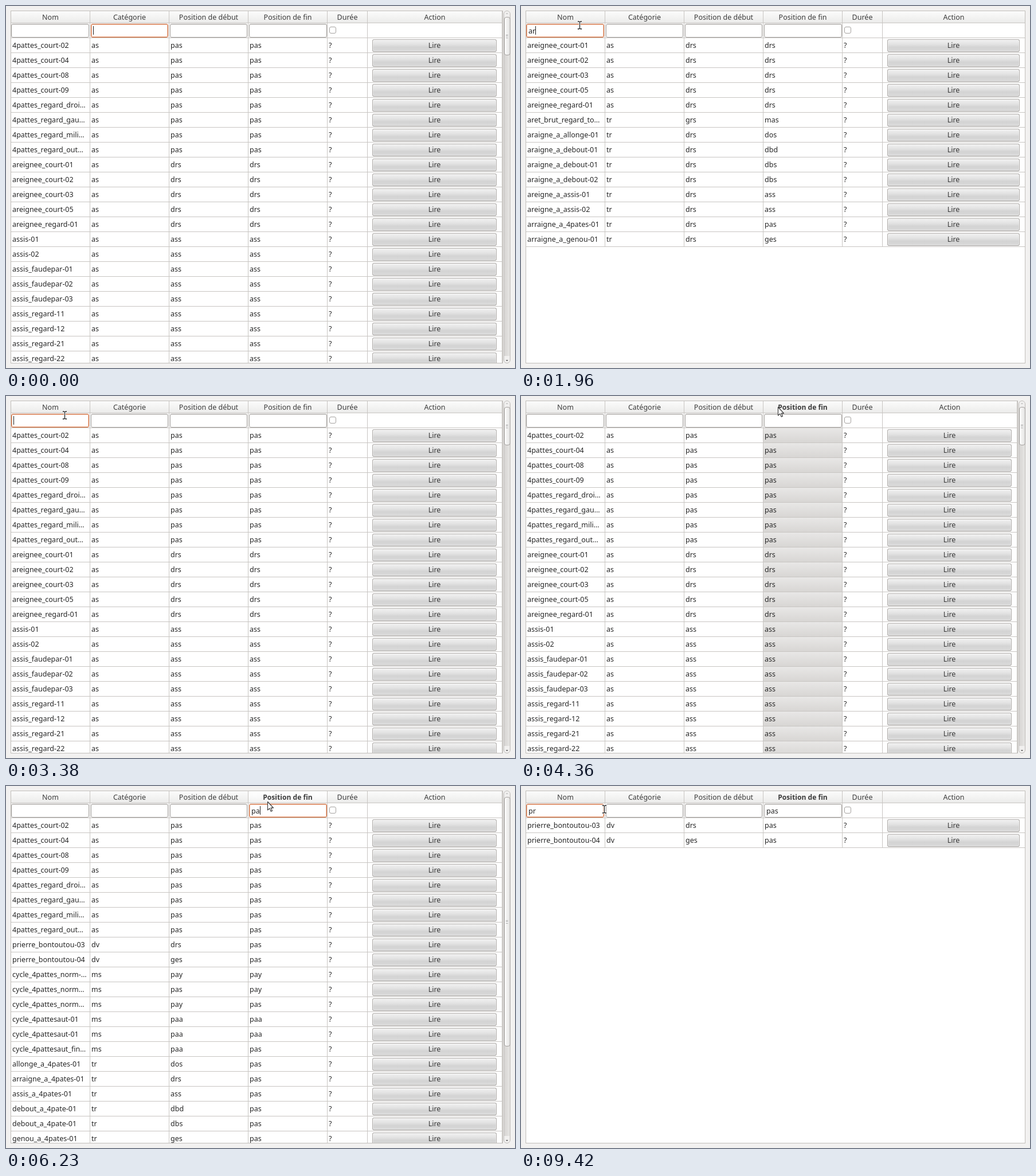
These frames come from a looping animation (888x631 px, 9.76 s). An HTML page:

```html
<!DOCTYPE html>
<html lang="fr">
<head>
<meta charset="utf-8">
<title>Table filtrable</title>
<style>
html, body { margin: 0; width: 100%; height: 100%; overflow: hidden; background: #f2f1f0; }
body { position: relative; font: 12.5px/26px "Noto Sans", "Open Sans", sans-serif; color: #262626; }
div { position: absolute; box-sizing: border-box; white-space: pre; }
#frame { left: 8px; top: 8px; height: 615px; background: #fff; border: 1px solid #c1beba; overflow: hidden; }
.cell { border: solid #c8c5c2; border-width: 0 1px 1px 0; padding-left: 2px; overflow: hidden; }
.head { background: linear-gradient(#fbfbfb, #f4f4f3 50%, #ebebea); color: #3c3c3c; text-align: center; line-height: 21px; padding: 0; }
.bold { font-weight: bold; font-size: 12.1px; }
.hover { background: linear-gradient(#fff, #fafafa 50%, #f1f1f0); }
.sel { background: linear-gradient(#e8e7e6, #d8d6d4); }
.btn { border: 1px solid #aeaba8; border-bottom-color: #9c9996; border-radius: 3px; text-align: center; line-height: 20px;
  color: #3c3c3c; background: linear-gradient(#f1f1f1, #e2e2e2 40%, #d3d3d3 65%, #dadada); box-shadow: inset 0 0 0 1px rgba(255,255,255,.4); }
.field { border: 1px solid #a3a09d; border-radius: 3px; background: #fff; box-shadow: inset 0 1px 1px #e2e0de; }
.focus { border-color: #cb6a3c; box-shadow: inset 0 0 0 1px #efbfa6; }
.field span { position: absolute; left: 3px; top: 3px; height: 15px; line-height: 17px; min-width: 1px; box-sizing: border-box; }
.caret { border-right: 1px solid #222; }
#check { left: 564px; top: 36px; width: 12px; height: 12px; border: 1px solid #a5a2a0; border-radius: 3px; background: #fff; }
#bar { left: 868px; top: 8px; width: 12px; height: 615px; border: 1px solid #bcb9b6; border-radius: 6px; background: linear-gradient(90deg, #d6d4d2, #e6e5e3); }
.cap { left: 0; width: 10px; height: 12px; background: #f0efee; }
#thumb { left: 0; top: 10px; width: 11px; border: 1px solid #a5a29f; border-radius: 4px; background: linear-gradient(90deg, #fcfcfc, #e4e3e2); }
#grip { left: 2px; top: 50%; margin-top: -3px; width: 4px; height: 6px; background: repeating-linear-gradient(#aaa 0 1px, #fafafa 1px 2.5px); }
.tri { left: 3px; border: 2.5px solid transparent; width: 0; height: 0; }
svg { position: absolute; left: 0; top: 0; overflow: visible; }
</style>
</head>
<body>
<div id="frame"></div>
<div id="fields"></div>
<div id="check"></div>
<div id="bar">
  <div class="cap" style="top:0;border-radius:5px 5px 0 0"></div>
  <div class="cap" style="bottom:0;border-radius:0 0 5px 5px"></div>
  <div class="tri" style="top:1px;border-bottom-color:#bbb"></div>
  <div class="tri" style="bottom:1px;border-top-color:#444"></div>
  <div id="thumb"><div id="grip"></div></div>
</div>
<svg id="pointer" width="1" height="1">
  <path id="arrow" d="M0 0V14.5L3.4 11.4L5.7 16.8L8 15.8L5.7 10.6H10Z" fill="#fff" stroke="#333" stroke-width="1.1" stroke-linejoin="round"/>
  <g id="beam" fill="none" stroke-linecap="square">
    <path d="M-3 -6.5H-1.5L0 -5.5L1.5 -6.5H3M0 -5.5V5.5M-3 6.5H-1.5L0 5.5L1.5 6.5H3" stroke="#fff" stroke-width="3"/>
    <path d="M-3 -6.5H-1.5L0 -5.5L1.5 -6.5H3M0 -5.5V5.5M-3 6.5H-1.5L0 5.5L1.5 6.5H3" stroke="#222" stroke-width="1.3"/>
  </g>
</svg>
<script>
const LOOP = 9760;
const $ = id => document.getElementById(id);

// category, start position, end position: names
const DATA = `
as pas pas: 4pattes_court-02 4pattes_court-04 4pattes_court-08 4pattes_court-09 4pattes_regard_droi… 4pattes_regard_gau… 4pattes_regard_mili… 4pattes_regard_out…
as drs drs: areignee_court-01 areignee_court-02 areignee_court-03 areignee_court-05 areignee_regard-01
as ass ass: assis-01 assis-02 assis_faudepar-01 assis_faudepar-02 assis_faudepar-03 assis_regard-11 assis_regard-12 assis_regard-21 assis_regard-22
dv drs pas: prierre_bontoutou-03
dv ges pas: prierre_bontoutou-04
ms pay pay: cycle_4pattes_norm-…
ms pas pay: cycle_4pattes_norm…
ms pay pas: cycle_4pattes_norm…
ms paa paa: cycle_4pattesaut-01 cycle_4pattesaut-01
ms paa pas: cycle_4pattesaut_fin…
tr grs mas: aret_brut_regard_to…
tr dos pas: allonge_a_4pates-01
tr drs dos: araigne_a_allonge-01
tr drs dbd: araigne_a_debout-01
tr drs dbs: araigne_a_debout-01 araigne_a_debout-02
tr drs ass: areigne_a_assis-01 areigne_a_assis-02
tr drs pas: arraigne_a_4pates-01
tr drs ges: arraigne_a_genou-01
tr ass pas: assis_a_4pates-01
tr dbd pas: debout_a_4pate-01
tr dbs pas: debout_a_4pate-01
tr ges pas: genou_a_4pates-01
vc ass pas: lavement-08
vc ges pas: masturbation-07 masturbation_netoy… masturbationlon-07`;
const ROWS = DATA.trim().split("\n").flatMap(line => {
  const [info, names] = line.split(": ");
  return names.split(" ").map(name => [name, ...info.split(" "), "?"]);
});

const HEADS = ["Nom", "Catégorie", "Position de début", "Position de fin", "Durée", "Action"];
const EDGES = [9, 147, 285, 423, 561, 631];
const FIELDS = [[9, 145], [148, 283], [286, 421], [424, 560]];
const THUMBS = { "": 67, pa: 435, pas: 501 };
const NOM = 0, CAT = 1, FIN = 3, NONE = -1;

// each step changes part of the state
const STEPS = [
  [0, { focus: CAT, caret: 1, nom: "", fin: "", sel: 0, bold: 0, hover: 0 }],
  [490, { caret: 0 }],
  [980, { focus: NOM, caret: 1 }],
  [1490, { caret: 0 }],
  [1960, { nom: "ar", caret: 1 }],
  [2010, { nom: "are" }],
  [2160, { nom: "arei" }],
  [2680, { caret: 0 }],
  [2730, { nom: "are", caret: 1 }],
  [3380, { nom: "" }],
  [3880, { caret: 0 }],
  [4150, { focus: NONE, sel: 1, bold: 1 }],
  [4390, { focus: FIN, caret: 1 }],
  [4890, { caret: 0 }],
  [5400, { caret: 1 }],
  [5500, { hover: 1 }],
  [5860, { caret: 0 }],
  [6230, { fin: "pa", caret: 1, sel: 0 }],
  [6280, { fin: "pas" }],
  [6780, { caret: 0 }],
  [6880, { hover: 0 }],
  [7240, { focus: NOM, caret: 1 }],
  [7740, { caret: 0 }],
  [8230, { caret: 1 }],
  [8710, { nom: "p" }],
  [8860, { nom: "pr" }],
  [9420, { caret: 0 }],
];

// pointer moves: start, end, number of steps, points
const MOVES = [
  [490, 820, 8, [[51, 13], [66, 17], [86, 31], [96, 41]]],
  [1140, 1180, 2, [[96, 41], [102, 33]]],
  [3740, 4710, 18, [[102, 33], [190, 10], [330, 2], [440, 14], [452, 22], [456, 38], [458, 34]]],
  [4800, 4890, 2, [[458, 34], [459, 35]]],
  [5400, 5550, 3, [[459, 35], [457, 31], [456, 27]]],
  [6640, 7400, 17, [[456, 27], [425, 15], [310, 10], [190, 36], [136, 44], [145, 40]]],
];

const box = (x, y, w, h, cls, text = "") =>
  `<div class="${cls}" style="left:${x}px;top:${y}px;width:${w}px;height:${h}px">${text}</div>`;

function drawTable(s, rows, full) {
  const edges = [...EDGES, full ? 880 : 866];
  const cell = (i, y, h, cls, text) => box(edges[i] - 9, y - 9, edges[i + 1] - edges[i], h, "cell " + cls, text);
  let html = HEADS.map((text, i) => {
    const fin = i === FIN;
    return cell(i, 9, 21, "head" + (fin && s.bold ? " bold" : "") + (fin && s.hover ? " hover" : ""), text) + cell(i, 30, 26, "");
  }).join("");
  rows.slice(0, 22).forEach((row, n) => {
    const y = 56 + 26 * n;
    html += row.map((text, i) => cell(i, y, 26, s.sel && i === FIN ? "sel" : "", text)).join("");
    html += cell(5, y, 26, "") + box(630, y - 7, edges[6] - 649, 22, "btn", "Lire");
  });
  $("frame").style.width = (full ? 872 : 859) + "px";
  $("frame").innerHTML = html;
  $("bar").style.display = full ? "none" : "";
  $("thumb").style.height = (THUMBS[s.fin] || 67) + "px";
}

function drawFields(s) {
  const texts = [s.nom, "", "", s.fin];
  $("fields").innerHTML = FIELDS.map(([x, end], i) => {
    const on = s.focus === i;
    const text = `<span class="${on && s.caret ? "caret" : ""}">${texts[i]}</span>`;
    return box(x, 31, end - x, 24, "field" + (on ? " focus" : ""), text);
  }).join("");
}

function along(points, p) {
  const f = p * (points.length - 1), i = Math.min(Math.floor(f), points.length - 2);
  return [0, 1].map(k => points[i][k] + (points[i + 1][k] - points[i][k]) * (f - i));
}

function drawPointer(t) {
  const move = MOVES.filter(m => m[0] <= t).pop();
  $("pointer").style.display = move ? "" : "none";
  if (!move) return;
  const [start, end, count, points] = move;
  const step = Math.min(count, 1 + Math.floor((t - start) / (end - start) * (count - 1)));
  const [x, y] = along(points, step / count).map(Math.round);
  const beam = y > 30 && y < 56;
  $("arrow").style.display = beam ? "none" : "";
  $("beam").style.display = beam ? "" : "none";
  $("pointer").style.transform = `translate(${x + .5}px, ${y + .5}px)`;
}

let shown = "", listed = "";
function render(t) {
  const s = Object.assign({}, ...STEPS.filter(step => step[0] <= t).map(step => step[1]));
  const key = JSON.stringify(s);
  if (key !== shown) {
    shown = key;
    const list = [s.nom, s.fin, s.sel, s.bold, s.hover].join();
    if (list !== listed) {
      listed = list;
      const rows = ROWS.filter(r => r[0].startsWith(s.nom) && r[3].startsWith(s.fin));
      drawTable(s, rows, rows.length < 22);
    }
    drawFields(s);
  }
  drawPointer(t);
}

const began = performance.now();
function tick() {
  render((performance.now() - began) % LOOP);
  requestAnimationFrame(tick);
}
tick();
</script>
</body>
</html>
```
